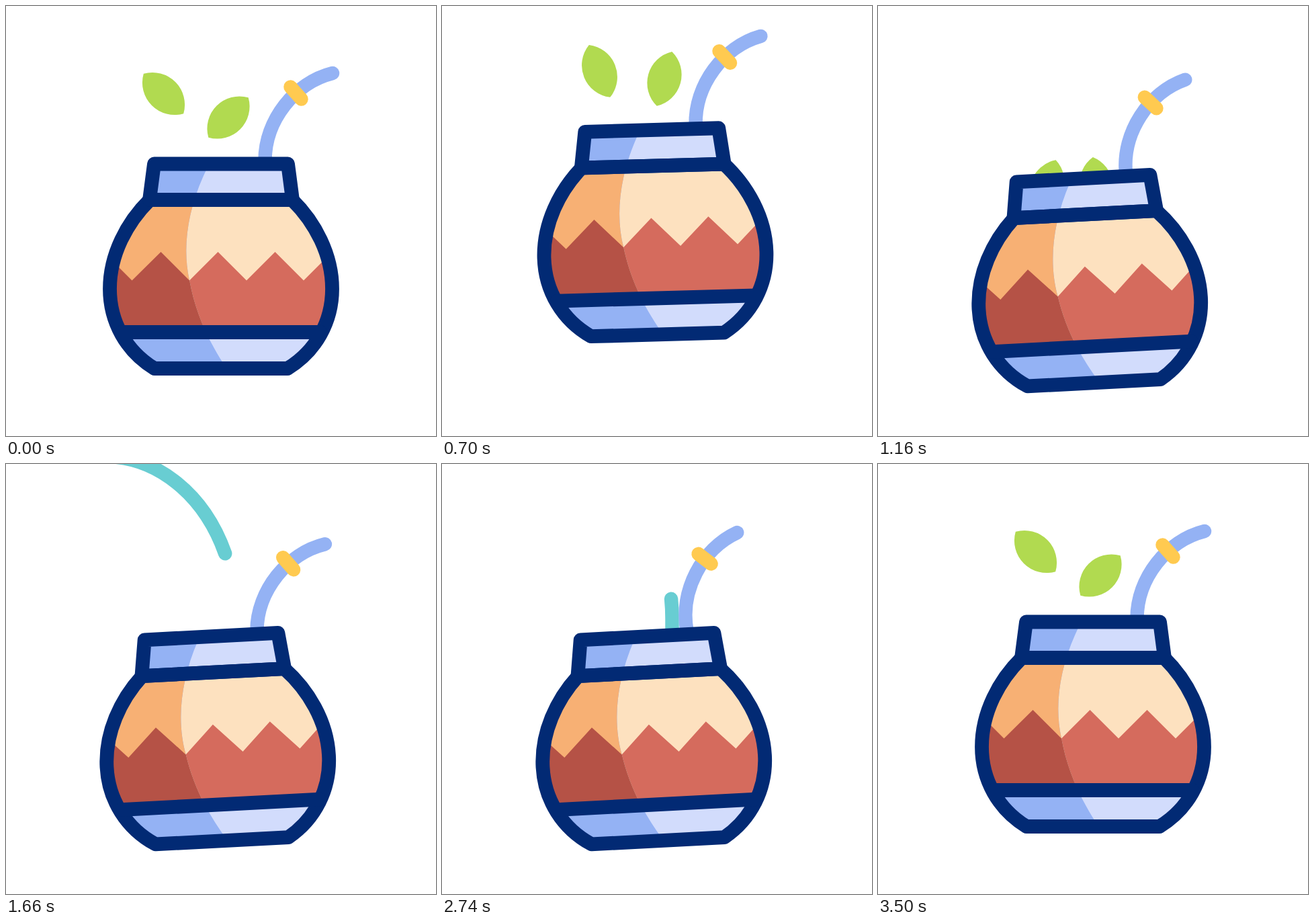
An HTML page for the animation above (3560 ms loop, 640 by 640 pixels).

```html
<!DOCTYPE html>
<html lang="en">
<head>
<meta charset="utf-8">
<title>Mate gourd</title>
<style>
  html, body { margin: 0; width: 100%; height: 100%; overflow: hidden; background: #fff; }
  svg { display: block; width: 100vw; height: 100vh; }
  .line { fill: none; stroke-width: 20.5; stroke-linecap: round; stroke-linejoin: round; }
  .navy { stroke: #022a74; stroke-width: 20.8; }
  .blue { stroke: #94b2f4; }
  .teal { stroke: #68cdd2; }
  .gold { stroke: #ffca50; }
</style>
</head>
<body>
<svg viewBox="0 0 640 640">
  <defs>
    <path id="body" d="M214 288.500C180 322 154.500 370 154.500 421C154.500 470 179 514 221 539.500H419C461 514 485.500 470 485.500 421C485.500 370 460 322 426 288.500Z"/>
    <path id="neck" d="M213.500 288.500L220.500 235H419.500L426.500 288.500Z"/>
    <path id="leaf" d="M-42 0A48 48 0 0 1 42 0A48 48 0 0 1 -42 0Z" fill="#b1da50"/>
    <path id="zigzag" d="M145 366L187.500 408.500L230.500 366L273 408.500L315.500 366L358 408.500L400.500 366L443 408.500L485.500 366L500 380V486H140V380Z"/>
    <clipPath id="inside"><use href="#body"/><use href="#neck"/></clipPath>
    <clipPath id="shade">
      <path d="M130 230H304L300 240C270 300 262 360 273 408C281 452 298 494 328 539V550H130Z"/>
    </clipPath>
  </defs>

  <g id="leaves">
    <use href="#leaf"/>
    <use href="#leaf"/>
  </g>
  <path id="stream" class="line teal" d="M148 -11A194.500 241 0 0 1 342.500 230V300"/>

  <g id="pot">
    <g id="straw">
      <path class="line blue" d="M385.500 290V230C385.500 170 430 114 486 100"/>
      <path class="line gold" d="M423.500 120.500L439.500 138.500"/>
    </g>
    <g clip-path="url(#inside)">
      <rect x="130" y="220" width="380" height="340" fill="#d2dcfc"/>
      <rect x="130" y="288" width="380" height="198" fill="#fde1bf"/>
      <use href="#zigzag" fill="#d56b5d"/>
      <g clip-path="url(#shade)">
        <rect x="130" y="220" width="380" height="340" fill="#94b2f4"/>
        <rect x="130" y="288" width="380" height="198" fill="#f7b074"/>
        <use href="#zigzag" fill="#b55246"/>
      </g>
    </g>
    <use href="#body" class="line navy"/>
    <use href="#neck" class="line navy"/>
    <path class="line navy" d="M172 485.500H468"/>
  </g>

  <g id="sparks" class="line gold">
    <path/><path/><path/>
  </g>
</svg>
<script>
const LOOP = 3560;
const $ = id => document.getElementById(id);
const clamp = p => Math.min(1, Math.max(0, p));
const span = (t, a, b) => clamp((t - a) / (b - a));
const sine = p => (1 - Math.cos(Math.PI * p)) / 2;
const soft = p => p < 0.5 ? Math.pow(2 * p, 2.5) / 2 : 1 - Math.pow(2 - 2 * p, 2.5) / 2;
const mix = (a, b, p) => a + (b - a) * p;

// keys: [time, value, ease into this key]
function track(keys, t) {
  for (let i = 1; i < keys.length; i++) {
    const [t1, v1, ease = sine] = keys[i];
    if (t < t1) {
      const [t0, v0] = keys[i - 1];
      return mix(v0, v1, ease(span(t, t0, t1)));
    }
  }
  return keys[keys.length - 1][1];
}

const potLift = [[220, 0], [540, -64], [1160, 21.3], [2890, 21.3], [3500, 0, soft]];
const potTilt = [[200, 0], [1160, -3], [2890, -3], [3500, 0, soft]];
const strawTilt = [[1080, 0], [1380, -13], [1860, 13], [2380, -13], [3200, 0]];

const leaves = [
  { x: 234.5, y: 130.5, angle: 45, peak: 46, fall: 4.79e-4, turn: 63, power: 1.5, drift: 17 },
  { x: 331, y: 166, angle: 135, peak: 69, fall: 4.4e-4, turn: -52, power: 0.85, drift: -6 }
];

const sparks = [
  { from: [461, 189], to: [488, 164], start: 3026, end: 3430 },
  { from: [469.5, 232], to: [508, 226], start: 3042, end: 3495 },
  { from: [471, 277], to: [499, 295], start: 3028, end: 3455 }
];

function show(el, on) {
  el.style.display = on ? "" : "none";
}

function drawLeaf(el, leaf, t) {
  const { x, y, angle, peak, fall, turn, power, drift } = leaf;
  let dx = 0, dy = 0, spin = 0;
  if (t < 1300) {
    dy = t < 540 ? -peak * sine(span(t, 220, 540)) : fall * (t - 540) ** 2 - peak;
    dx = drift * Math.max(0, (t - 700) / 460) ** 2;
    spin = turn * Math.max(0, (t - 220) / 940) ** power;
  } else {
    const left = 1 - sine(span(t, 2780, 3175));
    dy = -240 * left;
    spin = 55 * left;
  }
  show(el, t < 1300 || t > 2780);
  el.setAttribute("transform", `translate(${x + dx} ${y + dy}) rotate(${angle + spin})`);
}

function drawStream(t) {
  const el = $("stream"), total = el.getTotalLength();
  const head = total * sine(span(t, 1270, 1970));
  const tail = total * sine(span(t, 2310, 2950));
  show(el, head - tail > 0.1);
  el.setAttribute("stroke-dasharray", `${Math.max(0, head - tail)} 2000`);
  el.setAttribute("stroke-dashoffset", -tail);
}

function drawSpark(el, { from, to, start, end }, t) {
  const head = sine(span(t, start, start + 240));
  const tail = sine(span(t, start + 140, end));
  const at = p => `${mix(from[0], to[0], p)} ${mix(from[1], to[1], p)}`;
  show(el, head - tail > 0.001);
  el.setAttribute("d", `M${at(tail)}L${at(head)}`);
}

function draw(t) {
  $("pot").setAttribute("transform",
    `translate(0 ${track(potLift, t)}) rotate(${track(potTilt, t)} 320 512)`);
  $("straw").setAttribute("transform", `rotate(${track(strawTilt, t)} 382 275)`);
  leaves.forEach((leaf, i) => drawLeaf($("leaves").children[i], leaf, t));
  sparks.forEach((spark, i) => drawSpark($("sparks").children[i], spark, t));
  drawStream(t);
}

const began = performance.now();
function tick() {
  draw((performance.now() - began) % LOOP);
  requestAnimationFrame(tick);
}
tick();
</script>
</body>
</html>
```
